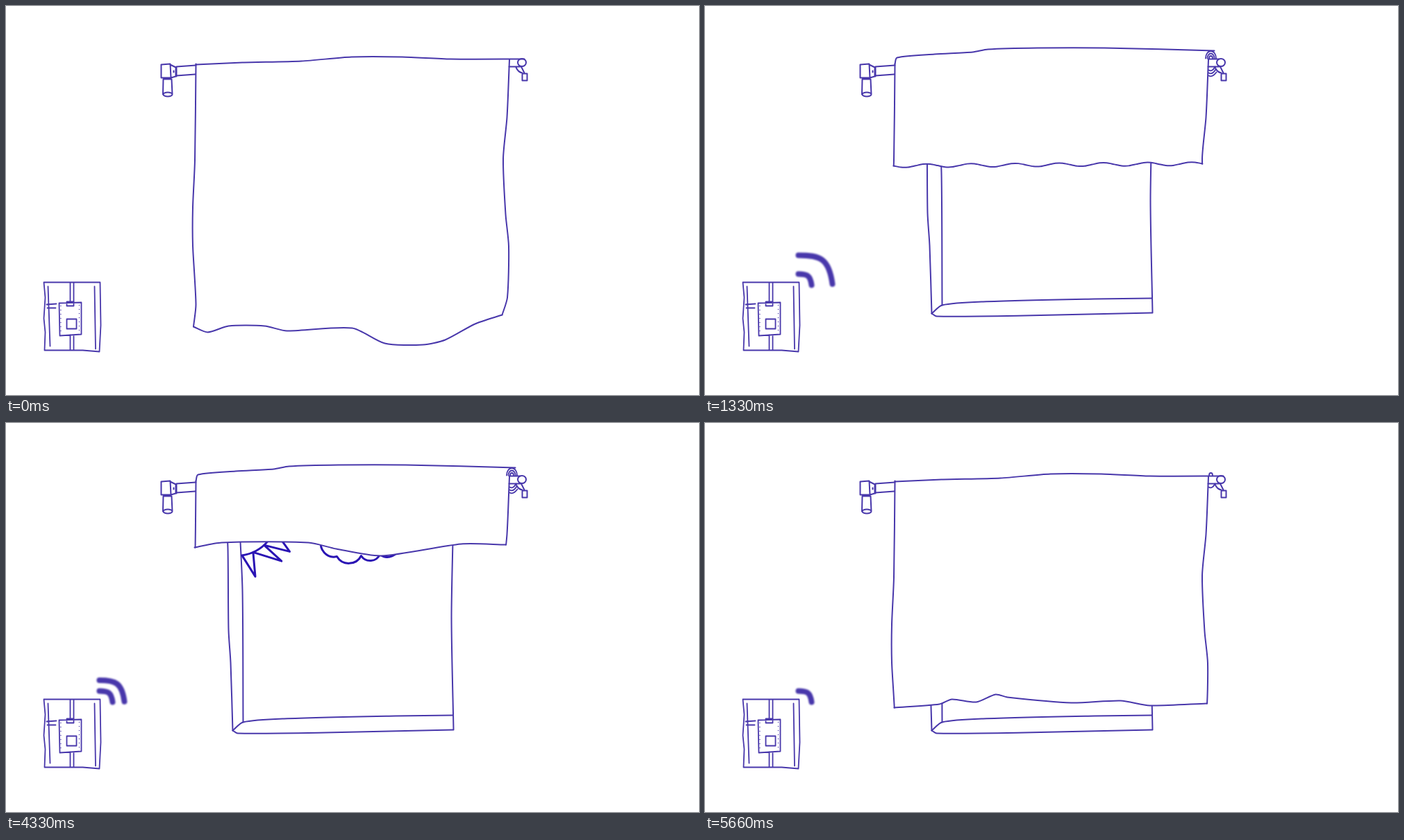
Animation of 998 by 561 pixels, one loop 6 s. Source, as an HTML page with a canvas:

```html
<!DOCTYPE html>
<html lang="en">
<head>
<meta charset="utf-8">
<title>Roller blind</title>
<style>
html, body { margin: 0; width: 100%; height: 100%; overflow: hidden; background: #fff; }
canvas { display: block; }
</style>
</head>
<body>
<canvas id="stage" width="998" height="561"></canvas>
<script>
const ctx = document.getElementById('stage').getContext('2d');
const INK = '#4837ab', DARK = '#2a14b4';

const points = text => text.split(' ').map(p => p.split(',').map(Number));

// Hand-drawn line: a soft curve through a few key points
function trace(pts) {
  ctx.moveTo(...pts[0]);
  for (let i = 0; i < pts.length - 1; i++) {
    const b = pts[i], c = pts[i + 1], a = pts[i - 1] || b, d = pts[i + 2] || c;
    const span = (p, q) => Math.hypot(q[0] - p[0], q[1] - p[1]);
    const reach = span(b, c) / 4;
    const k1 = reach / span(a, c), k2 = reach / span(b, d);
    ctx.bezierCurveTo(b[0] + (c[0] - a[0]) * k1, b[1] + (c[1] - a[1]) * k1,
      c[0] - (d[0] - b[0]) * k2, c[1] - (d[1] - b[1]) * k2, ...c);
  }
}

function curve(pts) {
  ctx.lineWidth = 2;
  ctx.beginPath();
  trace(pts);
  ctx.stroke();
}

function path(d, width = 1.8, color = INK) {
  ctx.lineWidth = width;
  ctx.strokeStyle = color;
  ctx.stroke(new Path2D(d));
}

// A hem that swings around a straight line
function ripple(x1, y1, x2, y2, size, waves) {
  const steps = Math.round(waves * 6);
  return Array.from({ length: steps + 1 }, (_, i) => {
    const u = i / steps;
    return [x1 + (x2 - x1) * u, y1 + (y2 - y1) * u + size * Math.sin(2 * Math.PI * waves * u)];
  });
}

const lowTop = points('273,84 340,81 425,79 497,73 570,73 640,76 746,76');
const midTop = points('273,81 325,71 375,72 440,64 560,64 595,67 655,62 690,66 726,66');
const highTop = points('273,83 276,74 330,69 385,66 407,62 478,60 575,60 733,64');
const leftSide = points('273,83 271.5,222 268.5,290 268.5,345 273,430 269.5,462');
const rightSide = points('724.5,77 721,160 715.5,220 719,300 723.5,346 721.5,420 714,445');

// From closed to open; roll = layers visible on the roller, signal = arc sizes
const poses = [
  { top: lowTop, roll: 0, signal: [],
    hem: points('269.5,462 290,470 320,461 372,461 404,468 498,464 545,486 600,488 632,481 675,458 714,445') },
  { top: lowTop, roll: 1, signal: [19],
    hem: points('272,410 337,405 355,398 390,402 418,391 435,395 527,403 598,400 640,407 722,404') },
  { top: midTop, roll: 2, signal: [36], hem: ripple(267, 350, 724, 347, 2, 7) },
  { top: midTop, roll: 2, signal: [49], hem: ripple(269, 291, 719, 287, 2, 6) },
  { top: highTop, roll: 3, signal: [19, 49], hem: ripple(271, 230, 716, 227, 2.5, 7) },
  { top: highTop, roll: 3, signal: [19, 36],
    hem: points('271,179 310,172 435,172 475,181 540,191 655,174 719,175') },
  { top: highTop, roll: 3, signal: [36], hem: ripple(272, 117, 724, 109, 0.8, 4) }
];

function drawWindow() {
  [ '316,128 319,180 320,298 323,345 326,443',
    '335,131 340,240 341,431',
    '316,128 328,131 643,127',
    '644,127 641,280 644,442',
    '326,443 341,431 400,426 560,422 643,421',
    '326,443 333,447 460,446 643,442' ].forEach(edge => curve(points(edge)));
}

function drawSun() {
  const at = (deg, r) => {
    const a = deg * Math.PI / 180;
    return `${331 + r * Math.cos(a)} ${131 + r * Math.sin(a)}`;
  };
  const tips = [5, 17, 35, 46, 73], bases = [10, 23, 48, 66, 82];
  const rays = tips.map((tip, i) => `L${at(tip, 94)}L${at(bases[i], 60)}`).join('');
  path(`M${at(0, 60)}A60 60 0 0 1 ${at(82, 60)}M${at(1, 76)}${rays}`, 3, DARK);
}

// Every pair of neighbouring cusps is joined by one puff
function drawCloud() {
  const cusps = points('454,168 460,151 476,148 503,146 529,147 541,148 565,147 579,156 566,177 538,189 511,191 476,192');
  const puffs = cusps.map(([x, y], i) => {
    const [nx, ny] = cusps[(i + 1) % cusps.length];
    const r = 0.57 * Math.hypot(nx - x, ny - y);
    return `A${r} ${r} 0 0 1 ${nx} ${ny}`;
  });
  path('M' + cusps[0] + puffs.join(''), 3, DARK);
}

function drawSide(pts, bottom) {
  ctx.save();
  ctx.beginPath();
  ctx.rect(0, 0, 998, bottom + 1);
  ctx.clip();
  curve(pts);
  ctx.restore();
}

function drawBlind({ top, hem }) {
  ctx.beginPath();
  trace(hem);
  ctx.lineTo(700, 80);
  ctx.lineTo(300, 80);
  ctx.fill();
  ctx.strokeStyle = INK;
  curve(top);
  curve(hem);
  drawSide(leftSide, hem[0][1]);
  drawSide(rightSide, hem.at(-1)[1]);
}

function drawBrackets(roll) {
  path('M223 84L236 83L237 103H223ZM236 84L244 88V101L237 103' +
    'M245 101V87L273 85M245 100L272 98M241 93V95' +
    'M225.5 127L226 105H238L239 127a6.5 3 0 1 1 -13 0a6.5 3 0 0 1 13 0', 2);
  path('M736.5 81a6 5.5 0 1 0 12 0a6 5.5 0 1 0 -12 0' +
    'M724 87H741M734 88Q737 95 743 96M742 88L746 96M743 97H750V107H743Z', 2);
  if (roll > 1) path('M724 76H740');
  for (let i = 1; i <= roll; i++) {
    path(`M${728 - 2.5 * i} 75a${2.5 * i} ${3.5 * i} 0 0 1 ${5 * i} 0` +
      `M725 ${88 + 4 * i}q5 3 ${8 + i} -5`);
  }
}

function drawSwitch() {
  path('M54 398H135L136 460L134 498L110 496H55L56 470L54 450L56 420Z' +
    'M60 404L63 490M127 404L128.5 494M92 399V427M97 399V427M92 474V496M97 474V496' +
    'M76 428L108 427V473L77 475ZM87 426H97V432H87ZM87 451H101V465H87ZM58 430L72 429M59 435H71');
  for (let y = 432; y < 471; y += 6) path(`M78.5 ${y}v.1M105 ${y - 1}v.1`, 1.4);
}

function drawSignal(sizes) {
  ctx.filter = 'blur(1.3px)';
  for (const s of sizes) {
    path(`M134 ${403 - 0.9 * s}c${0.65 * s} 0 ${0.9 * s} ${0.1 * s} ${s} ${0.85 * s}`, 8);
  }
  ctx.filter = 'none';
}

const changes = [330, 670, 1000, 1330, 1670, 2000, 4330, 4660, 5000, 5330, 5660];
let shown = -1;

function frame(now) {
  const passed = changes.filter(c => c <= now % 6000).length;
  const step = Math.min(passed, 12 - passed);
  if (step !== shown) {
    shown = step;
    const pose = poses[step];
    ctx.clearRect(-1, -1, 1000, 563);
    ctx.strokeStyle = INK;
    drawWindow();
    drawSun();
    drawCloud();
    drawBlind(pose);
    drawBrackets(pose.roll);
    drawSwitch();
    drawSignal(pose.signal);
  }
  requestAnimationFrame(frame);
}

ctx.translate(0.5, 0.5);
ctx.fillStyle = '#fff';
ctx.lineCap = ctx.lineJoin = 'round';
frame(performance.now());
</script>
</body>
</html>
```
